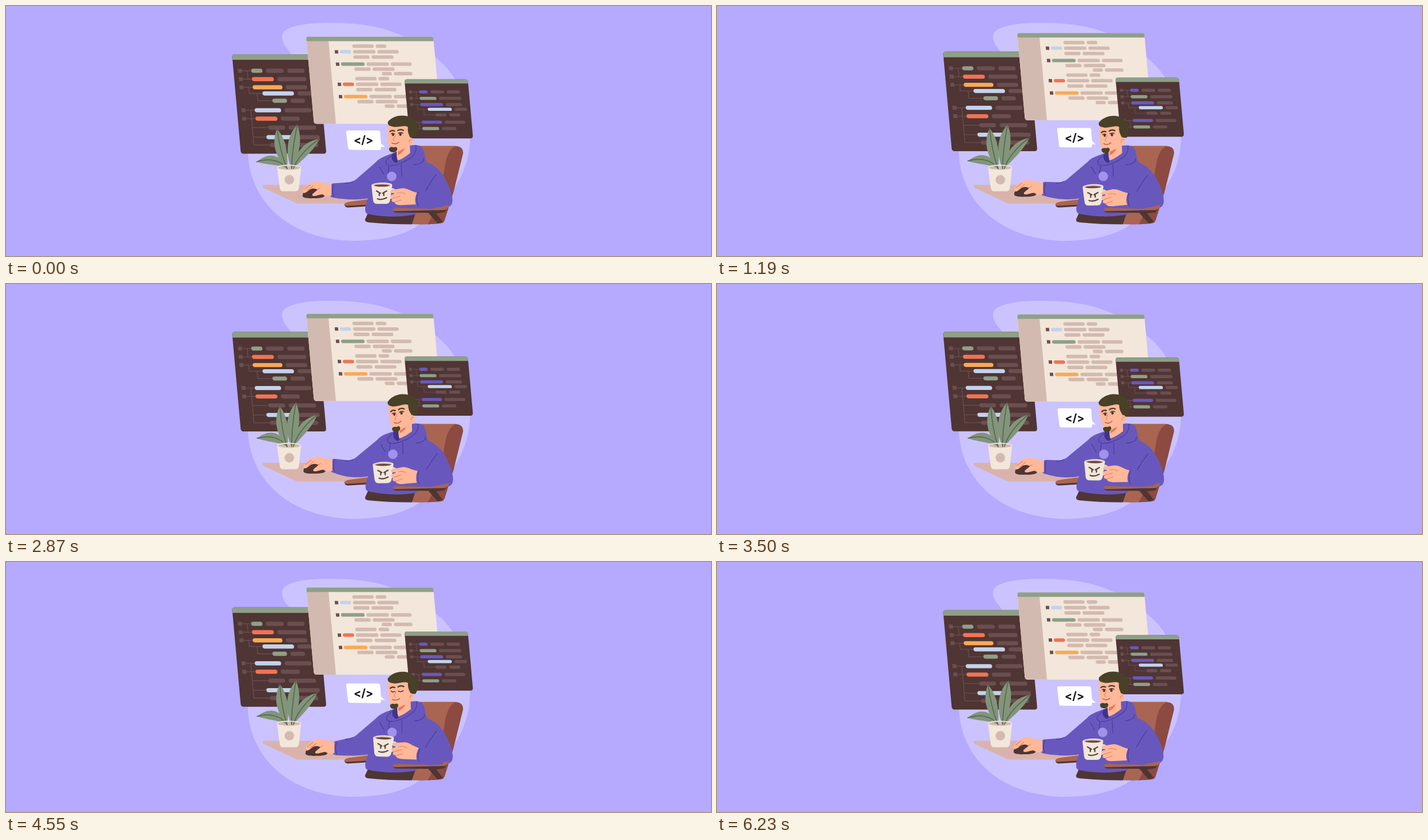
Recreate the animation shown at these times as an HTML page. Size 1254 px wide and 446 px high, loop 6.3 s.

```html
<!DOCTYPE html>
<html lang="en">
<head>
<meta charset="utf-8">
<title>Developer at work</title>
<style>
  html, body { margin: 0; width: 100%; height: 100%; overflow: hidden; background: #b5aaff; }
  svg { display: block; width: 100%; height: 100%; }
  .dark { fill: #4f3534; }
  .sage { fill: #8f9f88; }
  .cream { fill: #f2e7da; }
  .sand { fill: #d3bab0; }
  .mute { fill: #6b4f50; }
  .red { fill: #f07454; }
  .gold { fill: #f9a956; }
  .sky { fill: #c3d3ec; }
  .violet, .hood { fill: #6858be; }
  .skin { fill: #ffb898; }
  .hair { fill: #484127; }
  .wood { fill: #a96552; }
  .rust { fill: #8c4a41; }
  .line { fill: none; stroke-linecap: round; stroke-linejoin: round; }
  .tree { stroke: #6b4f50; stroke-width: 1.4; stroke-linecap: butt; }
  .fold { stroke: #4a3d9a; stroke-width: 1.3; }
  .crease { stroke: #e8805f; stroke-width: 1.1; }
  .ink { stroke: #4f3534; stroke-width: 1.5; }
  text { font: 700 20px Inter, "Open Sans", sans-serif; text-anchor: middle; fill: #17151c; }
</style>
</head>
<body>
<svg viewBox="0 0 1254 446" preserveAspectRatio="xMidYMid slice">
  <path fill="#cbc3ff" d="M491 53C493 31 560 27 622 32C690 38 738 66 770 97C808 128 832 190 824 255C818 298 798 328 776 352C748 382 722 418 618 419C500 417 430 345 430 255C430 190 520 150 508 88C505 79 490 70 491 53Z"/>

  <g id="screens"></g>

  <!-- chair and desk -->
  <path class="wood" d="M728 253Q730 249.500 738 249.500H800Q806 251 803 264L778 387Q750 391 720 389Z"/>
  <path class="rust" d="M800 250Q814 251 813 263L796 332L780 383Q778 387 772 388L750 389.500C764 366 772 342 776 315C781 290 781 257 800 250Z"/>
  <path fill="#d9b3ab" d="M457 319H625L662 352.500H518L457 324Z"/>
  <path class="dark" d="M602 353L650 349L650 357L608 359.500Q602 359.500 602 353Z"/>
  <path class="wood" d="M602 354Q603 350 612 349L650 344V354L606 356.500Q602 356.500 602 354Z"/>

  <!-- plant -->
  <ellipse cx="503.500" cy="288.500" rx="20" ry="3.800" class="sand"/>
  <g id="plant"></g>
  <path class="cream" d="M482 288C484 293.500 523 293.500 525 288L521 325Q520 330.500 514 330.500H493Q488 330.500 487 325Z"/>
  <path class="line" stroke="#f2e7da" stroke-width="1.800" d="M483 288C483 283 524 283 524 288"/>
  <circle class="sand" cx="504" cy="310" r="8.500"/>

  <path id="arm" class="hood"/>
  <path id="armFold" class="line fold"/>
  <g id="mouse">
    <path class="dark" d="M527.500 338C528 329 540 324 551 325L567 335C568 341 563 343 548 343C537 343.500 527 343 527.500 338Z"/>
    <path class="skin" d="M579 317.500C570 319 558 310.500 546 313.500C537 317 526 327 528 332C530 336.500 536 331 541 327C546 325 550 325.500 554 327.500C552 331 543 335 545 338C549 341 557 336 563 336C568 340 574 340 579 338Z"/>
    <path class="line crease" d="M531 327L541 319M536 330L546 321M554 327.500L558 325"/>
  </g>

  <!-- body -->
  <path class="dark" d="M644 369L728 371L722 389.500Q680 389.500 645 386Q637 385 639 380Z"/>
  <g id="body">
    <path class="hood" d="M690 262C676 267 663 271 658 279L643 345C637 362 638 369 643 371C670 377 702 377 728 372L741 361C760 363 782 363 790 357C797 352 794 338 790 327C782 306 771 287 750 279C744 276 746 255 737 250C724 245 712 250 690 262Z"/>
    <path fill="#3f338c" d="M687 264C684 270 687 278 694 280L706 270L698 258Z"/>
    <path class="skin" d="M695 252L718 240L719 262C712 268 706 272 697 276Q694 270 695 252Z"/>
    <path class="red" d="M697 260Q705 257 709 252Q708 261 697 266Z"/>
    <path class="line fold" d="M687 266C677 272 672 280 680 284C690 287 712 278 724 267Q731 259 729 249M681 285L679 305M703 283L704 304M743 272C744 278 735 283 726 283M664 287L672 300M765 301C758 309 751 322 746 330"/>
    <circle cx="686" cy="304" r="8.500" fill="#a193ed"/>
  </g>

  <!-- armrest -->
  <path class="dark" d="M689 364L784 361L780 368L765 370L777 385L768 388L751 369L694 368.500Q688 368 689 364Z"/>
  <path class="wood" d="M688 363Q691 359 704 360.500L756 362L789 355Q786 363 779 364L692 366Q688 366 688 363Z"/>

  <g id="cup">
    <path class="line" stroke="#e2d3c6" stroke-width="4" d="M684 327C695 324 697 343 682 342"/>
    <path class="cream" d="M650 320C651 314 685 313 687 319L683 347Q682 353 675 353H660Q654 353 653 347Z"/>
    <ellipse class="sand" cx="668.500" cy="319.500" rx="16" ry="3"/>
    <ellipse cx="668.500" cy="320.300" rx="13.500" ry="1.900" fill="#6b4541"/>
    <path class="line" stroke="#5c4a43" stroke-width="2.400" d="M659 330L666 334M677 330L670 334M664 334V338M672 334V338M661 344Q668 347 677 342"/>
  </g>
  <g id="hand">
    <path class="hood" d="M731 331C727 339 727 351 731 358C744 362 765 361 776 358L772 336C757 339 744 336 731 331Z"/>
    <path class="line fold" d="M733 333Q729 345 733 357"/>
    <path class="skin" d="M731 333C721 331 714 325 705 325L687 328C682 330 683 334 689 334L698 333L685 337C682 340 684 343 688 343C684 347 686 350 691 350C692 355 700 356 708 355L729 354Q726 344 731 333Z"/>
    <path class="line crease" d="M688 343L701 339M691 350L703 346M698 333Q705 332 710 335"/>
  </g>

  <g id="head">
    <path class="skin" d="M680 211C678 230 679 243 683 254C687 261 694 261 701 256C709 255 717 249 720 242L722 210Z"/>
    <path class="hair" d="M679 207C684 200 694 195 706 195.500C722 196 732 206 732 219C732 227 730 233 727 236L719 235C716 228 714 224 715 216C708 211 695 219 684 214Q679 213 679 207Z"/>
    <ellipse class="skin" cx="719" cy="241.500" rx="5.600" ry="7"/>
    <path class="line crease" d="M717 243Q718 237 722 239M693 230C691 236 686 238 691 240"/>
    <path class="line" stroke="#484127" stroke-width="2.400" d="M683 224Q686 221 691 223M697 222Q702 219 707 222"/>
    <g id="open">
      <ellipse class="dark" cx="688.500" cy="229.500" rx="2" ry="2.600"/>
      <ellipse class="dark" cx="701.500" cy="229" rx="2.200" ry="2.700"/>
      <path class="line ink" d="M685 228Q688 226 691 228M698 227Q702 224.500 706 227"/>
    </g>
    <path id="shut" class="line ink" d="M684 229Q687 232 691 230M697 229.500Q701 232.500 706 229"/>
    <path class="line" stroke="#b4503f" stroke-width="1.300" d="M686 244Q693 248 699 243"/>
    <path class="hair" d="M682 253Q686 250.500 690 252.500Q694 250 696 254C696 259 692 261.500 688 261C683 261 680 257 682 253Z"/>
  </g>

  <g id="bubble">
    <path fill="#fff" d="M605 225Q605 222 608 222H662Q665 222 665.500 225L667 245L674 251.500L667 251V254Q667 257 663.500 257L612 256.500Q609 256.500 608.500 253.500Z"/>
    <text x="636" y="246.500">&lt;/&gt;</text>
  </g>
</svg>
<script>
const LOOP = 6300, STEP = 70, SLANT = 5.1;
const $ = id => document.getElementById(id);
const add = (parent, tag, attrs) => {
  const el = document.createElementNS('http://www.w3.org/2000/svg', tag);
  for (const k in attrs) el.setAttribute(k, attrs[k]);
  return parent.appendChild(el);
};

// Cosine easing through [time, value] key points, wrapping round the loop.
function ease(...keys) {
  const last = keys[keys.length - 1], first = keys[0];
  const ring = [[last[0] - LOOP, last[1]], ...keys, [first[0] + LOOP, first[1]]];
  return t => {
    const i = ring.findIndex(k => k[0] > t);
    const [a, u] = ring[i - 1], [b, v] = ring[i];
    return u + (v - u) * (1 - Math.cos(Math.PI * (t - a) / (b - a))) / 2;
  };
}
// Two rises and falls per loop.
const bob = (rise, top1, low1, top2, low2) =>
  ease([top1, 0], [low1, -rise], [top2, 0], [low2, -rise]);

// Windows are upright inside a slanted group.
const screens = [];
function screen(x, y, w, h, bar, fill, move) {
  const g = add($('screens'), 'g', {});
  add(g, 'rect', { class: fill, width: w, height: h, rx: 4.5 });
  screens.push({ g, x, y, move });
  return {
    g,
    cap: () => add(g, 'path', { class: 'sage', d: `M0 ${bar}V4Q0 0 4 0H${w - 4}Q${w} 0 ${w} 4V${bar}Z` })
  };
}
function words(g, x, y, h, gap, widths, first, rest) {
  widths.forEach((width, i) => {
    add(g, 'rect', { class: i ? rest : first, x, y: y - h / 2, width, height: h, rx: h / 2 });
    x += width + gap;
  });
}
const node = (g, x, y, size, cls) =>
  add(g, 'rect', { class: cls, x, y: y - size / 2, width: size, height: size });

// y, depth, word widths
const outline = [
  [29.5, 0, 20, 32, 31], [44.5, 0, 39, 52], [59, 0, 53, 38], [70, 1, 56, 29], [83, 2, 26, 26],
  [100, 0, 47, 48], [115, 0, 39, 34], [131, 1.3, 30, 49], [148, 1, 47, 42], [162, 1.3, 30, 50]
];
function codeTree(x, y, w, h, scale, move, colors) {
  const win = screen(x, y, w, h, 10 * scale, 'dark', move);
  const g = add(win.g, 'g', { transform: `scale(${scale})` });
  const parents = [];
  let d = 'M24.5 29.5V44.5M24.5 100V115';
  colors.forEach((color, i) => {
    const [rowY, depth, ...widths] = outline[i], level = Math.floor(depth), left = 31.5 + depth * 16.5;
    parents[level] = rowY;
    d += level ? `M${10.5 + 14 * level} ${parents[level - 1]}V${rowY}H${left + 1}` : `M8 ${rowY}H${left + 1}`;
    if (!level) node(g, 8, rowY, 7, 'mute');
    words(g, left, rowY, 7.4, 6, widths, color, 'mute');
  });
  g.prepend(add(g, 'path', { class: 'line tree', d }));
  win.cap();
}
function document2(x, y, w, h, move) {
  const win = screen(x, y, w, h, 8, 'cream', move), g = win.g, left = 80.5, margin = 57.5;
  add(g, 'path', { class: 'sand', d: `M0 4H39V${h}H4.5Q0 ${h} 0 ${h - 4.5}Z` });
  [['sky', 'sage'], ['red', 'gold']].forEach((pair, i) => {
    const row = (dy, x, ...widths) => words(g, x, dy + 58 * i, 6.2, 3.5, widths, 'sand', 'sand');
    const head = (dy, color, ...widths) => {
      node(g, margin - 9, dy + 58 * i, 6, 'mute');
      words(g, margin, dy + 58 * i, 6.2, 3.3, widths, color, 'sand');
    };
    row(17, left, 38, 19);
    head(27, pair[0], 20, 40, 38);
    row(36.5, left, 29, 39);
    head(49, pair[1], 42, 40, 37);
    row(58, left, 29, 39);
    row(66, left + 48, 18, 33);
  });
  win.cap();
}

const leftBob = bob(5.3, 100, 1600, 3150, 4700);
codeTree(402, 86, 152, 177.5, 1, leftBob,
  ['sage', 'red', 'gold', 'sky', 'sage', 'sky', 'red', 'mute', 'sky', 'mute']);
document2(534, 55, 226, 155.5, bob(10.3, 200, 1850, 3230, 4820));
codeTree(708.7, 131.5, 112.7, 105.5, .765, bob(7.8, 400, 2030, 3300, 4750),
  ['violet', 'sage', 'violet', 'sky', 'mute', 'violet', 'sage']);

// Leaf outline from base to tip, with a bend and a middle rib.
function leaf(x, y, tx, ty, w, bend, sway) {
  const dx = tx - x, dy = ty - y, len = Math.hypot(dx, dy);
  const at = (k, o) => `${x + dx * k - dy / len * o} ${y + dy * k + dx / len * o}`;
  const near = o => at(.25, bend + o * .7), far = o => at(.65, bend + o * 1.25);
  const g = add($('plant'), 'g', {});
  add(g, 'path', {
    d: `M${x} ${y}C${near(w)} ${far(w)} ${tx} ${ty}C${far(-w)} ${near(-w)} ${x} ${y}Z`, fill: '#82957a'
  });
  add(g, 'path', {
    d: `M${x} ${y}C${near(0)} ${far(0)} ${tx} ${ty}`, class: 'line', stroke: '#56684f', 'stroke-width': 1.7
  });
  return { g, x, y, sway };
}
const leaves = [
  leaf(500, 290, 446, 278, 11, 12, 3),
  leaf(500, 290, 482, 219, 13, -3, 4),
  leaf(511, 290, 558, 237, 11, -7, -4.5),
  leaf(508, 290, 518, 212, 14, -2, -1.6)
];

const lean = ease([300, 0], [2100, 1], [3800, 1], [5050, 0]);
const sway = ease([0, 0], [2200, 1], [4500, 1]);
const mouseX = ease([0, 0], [2000, 1.6], [2900, 1.6], [4600, 5.2]);
const mouseY = ease([0, 0], [2200, -4.8], [2900, -4.8], [4650, 2.8]);
const cupX = ease([0, 0], [3900, 3]);
const cupY = ease([0, 0], [2170, 5], [4300, -6]);
const pop = ease([0, 1], [2000, 1], [2170, 1.16], [2520, 0], [3290, 0], [3570, 1.16], [3780, 1]);

const put = (id, value) => $(id).setAttribute('transform', value);

function draw(t) {
  const mx = mouseX(t), my = mouseY(t), b = lean(t), cx = cupX(t), cy = cupY(t);
  for (const { g, x, y, move } of screens)
    g.setAttribute('transform', `translate(${x} ${y + move(t)}) skewX(${SLANT})`);
  for (const { g, x, y, sway: a } of leaves)
    g.setAttribute('transform', `rotate(${a * sway(t)} ${x} ${y})`);
  put('body', `rotate(${1.5 * b} 700 385)`);
  put('head', `rotate(${-7 * b} 714 213)`);
  put('mouse', `translate(${mx} ${my})`);
  put('cup', `translate(${cx} ${cy}) rotate(${-cy / 3} 668 335)`);
  put('hand', `translate(${cx * .7} 0) rotate(${-cy * .9} 745 350)`);
  put('bubble', `translate(674 ${251 + leftBob(t)}) scale(${pop(t)}) translate(-674 -251)`);

  const at = (x, y) => `${x + mx} ${y + my}`;
  $('arm').setAttribute('d', `M${662 + 2 * b} 275L623 309Q617 314 609 314.500L${at(582, 316.5)}Q${at(576, 317)} ${at(577, 324)}L${at(575, 335)}Q${at(575, 341)} ${at(583, 342)}C605 346 630 346 645 343L680 330Z`);
  $('armFold').setAttribute('d', `M617 313Q610 317 604 316M${at(583, 319)}Q${at(579, 330)} ${at(583, 340)}`);

  const blink = t >= 4480 && t < 4690;
  $('open').style.display = blink ? 'none' : '';
  $('shut').style.display = blink ? '' : 'none';
}

const start = performance.now();
function tick() {
  const t = (performance.now() - start) % LOOP;
  draw(Math.floor(t / STEP) * STEP);
  requestAnimationFrame(tick);
}
draw(0);
requestAnimationFrame(tick);
</script>
</body>
</html>
```
